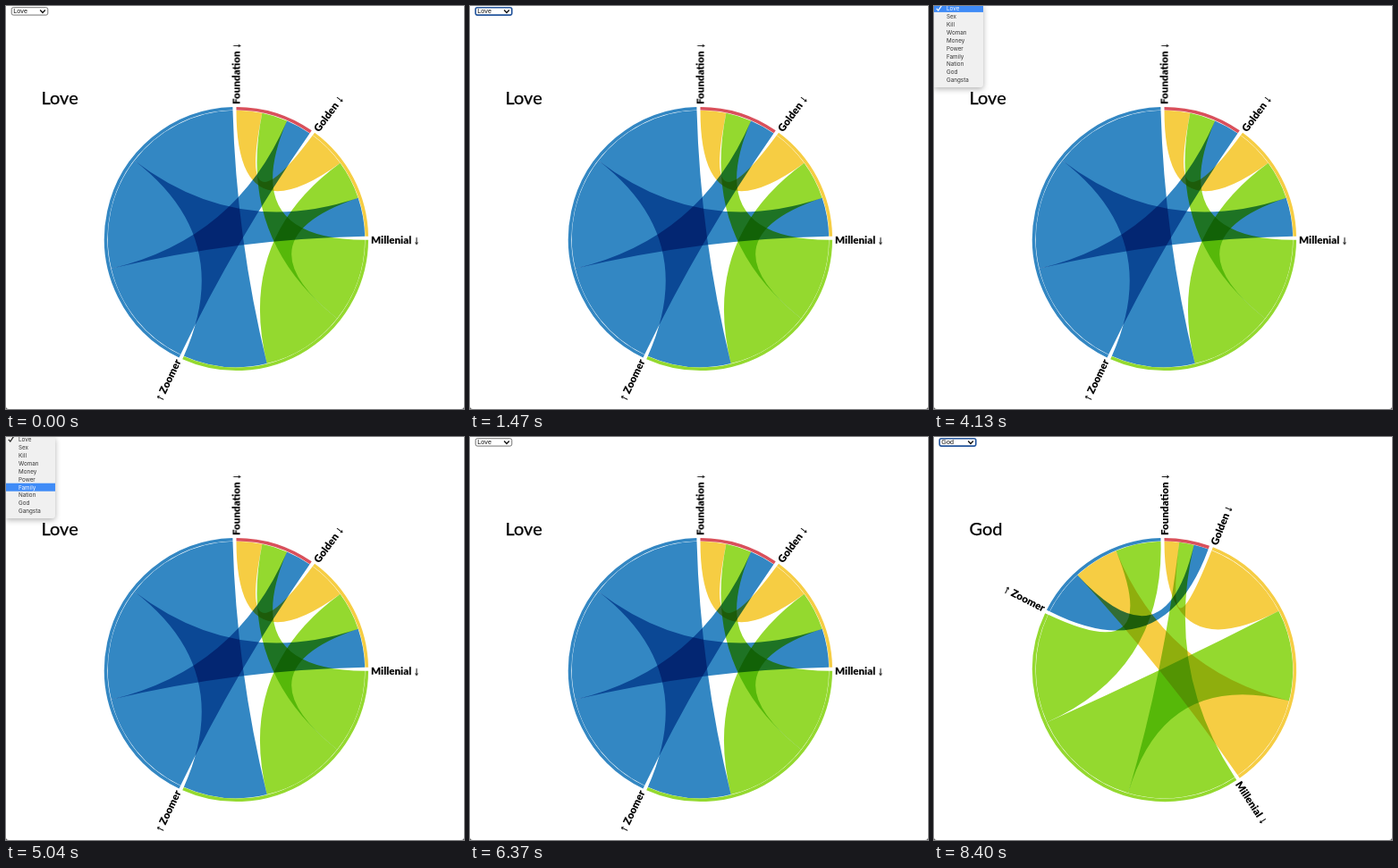
Recreate the animation shown at these times as an HTML page. Size 512 by 451 pixels, loop 8470 ms.

```html
<!DOCTYPE html>
<html lang="en">
<head>
<meta charset="utf-8">
<title>Chord diagram</title>
<style>
  html, body { margin: 0; width: 100%; height: 100%; overflow: hidden; background: #555; }
  svg { display: block; width: 100vw; height: 100vh; }
  .ribbon { mix-blend-mode: multiply; }
  .chart { isolation: isolate; }
  .label { font: 900 11.6px Lato, sans-serif; }
  .arrow { font: bold 13px "Liberation Sans", sans-serif; stroke: #000; stroke-width: .3; }
  .title { font: 400 20px Lato, sans-serif; stroke: #000; stroke-width: .25; }
  .value { font: 7.2px "Liberation Sans", Arial, sans-serif; fill: #111; }
  .item { font: 6.3px Inter, sans-serif; fill: #333; }
  .on { fill: #fff; }
  #menu { filter: drop-shadow(0 2px 3px rgba(0, 0, 0, .3)); }
</style>
</head>
<body>
<svg id="stage" viewBox="0 0 512 451">
  <path d="M0 0H512V448Q512 451 509 451H3Q0 451 0 448Z" fill="#fff"/>
  <g id="charts"></g>
  <text id="title" class="title" x="39.5" y="109.5"></text>
  <g id="select">
    <rect id="box" x="6.2" y="1.7" width="40.6" height="8.4" rx="2" fill="#fff"/>
    <text id="value" class="value" x="8.3" y="8.3"></text>
    <path d="M38.2 4.6L41 7.4L43.8 4.6" fill="none" stroke="#111" stroke-width="1.4"/>
  </g>
  <g id="menu">
    <path d="M0 0H55V88Q55 91 52 91H0Z" fill="#f0f0f0"/>
    <rect id="bar" width="55" height="9" fill="#3f8bf7"/>
    <path id="check" d="M2.8 2.8L4.8 5L8.6 -.6" fill="none" stroke-width="1.2"/>
  </g>
</svg>
<script>
const LOOP = 8470, PAD = 1.6, CX = 257.5, CY = 260.5;
const RIBBON_R = 143.7, RING_R = 145.8, RING_W = 3.6, LABEL_R = 150.5;
const names = ['Foundation', 'Golden', 'Millenial', 'Zoomer'];
const colors = ['#d9505b', '#f6cd43', '#94d92f', '#3387c3'];
const words = ['Love', 'Sex', 'Kill', 'Woman', 'Money', 'Power', 'Family', 'Nation', 'God', 'Gangsta'];
const spans = { Love: [34.8, 52.5, 113.6, 152.7], God: [20, 123.6, 148.6, 61.4] };

const FOCUS = 1400, OPEN = 3500, CLOSE = 6300, SWAP = 6440;
// When the highlight reaches each menu row
const hover = [OPEN, 4270, 4410, 4550, 4690, 4830, 4970, 5530, 5740];

const $ = id => document.getElementById(id);

function add(parent, tag, attrs, text = '') {
  const el = document.createElementNS('http://www.w3.org/2000/svg', tag);
  for (const key in attrs) el.setAttribute(key, attrs[key]);
  el.textContent = text;
  parent.appendChild(el);
  return el;
}

function point(deg, r) {
  const a = deg * Math.PI / 180;
  return `${(r * Math.sin(a)).toFixed(2)} ${(-r * Math.cos(a)).toFixed(2)}`;
}

const arc = (from, to, r) => `A${r} ${r} 0 ${to - from > 180 ? 1 : 0} 1 ${point(to, r)}`;

function ribbon([s0, s1], [t0, t1]) {
  const r = RIBBON_R;
  return `M${point(s0, r)}${arc(s0, s1, r)}Q0 0 ${point(t0, r)}${arc(t0, t1, r)}Q0 0 ${point(s0, r)}Z`;
}

function addLabel(chart, name, deg) {
  const flip = deg > 180;
  const text = add(chart, 'text', {
    class: 'label', dy: '.35em', 'text-anchor': flip ? 'end' : 'start',
    transform: `rotate(${deg - 90}) translate(${LABEL_R})${flip ? ' rotate(180)' : ''}`
  });
  const arrow = () => add(text, 'tspan', { class: 'arrow' }, flip ? '↑' : '↓');
  if (flip) arrow();
  text.append(flip ? ' ' + name : name + ' ');
  if (!flip) arrow();
}

function buildChart(sizes) {
  const chart = add($('charts'), 'g', { class: 'chart', transform: `translate(${CX} ${CY})` });
  let next = 0;
  const starts = sizes.map(size => {
    const start = next;
    next += size + PAD;
    return start;
  });
  // Each group is shared equally among the other three
  const part = (i, j) => {
    const third = sizes[i] / 3, from = starts[i] + third * (j < i ? j : j - 1);
    return [from, from + third];
  };
  sizes.forEach((size, i) => {
    for (let j = i + 1; j < sizes.length; j++) {
      add(chart, 'path', {
        class: 'ribbon', d: ribbon(part(i, j), part(j, i)),
        fill: colors[size > sizes[j] ? i : j]
      });
    }
  });
  sizes.forEach((size, i) => {
    const from = starts[i];
    add(chart, 'path', {
      d: `M${point(from, RING_R)}${arc(from, from + size, RING_R)}`,
      fill: 'none', stroke: colors[i], 'stroke-width': RING_W
    });
    addLabel(chart, names[i], from);
  });
  return chart;
}

const charts = {};
for (const word in spans) charts[word] = buildChart(spans[word]);
const rowY = i => 2.4 + i * 8.97;
const items = words.map((word, i) => add($('menu'), 'text', { class: 'item', x: 14, y: rowY(i) + 2.3 }, word));

const show = (el, on) => el.setAttribute('visibility', on ? 'visible' : 'hidden');

function draw() {
  const t = performance.now() % LOOP;
  const word = t < SWAP ? 'Love' : 'God';
  const open = t >= OPEN && t < CLOSE;
  const focused = t >= FOCUS && t < CLOSE || t >= SWAP;
  const row = Math.max(0, hover.filter(time => t >= time).length - 1);

  for (const key in charts) charts[key].style.display = key === word ? '' : 'none';
  $('title').textContent = $('value').textContent = word;
  $('box').setAttribute('stroke', focused ? '#24559c' : '#666');
  $('box').setAttribute('stroke-width', focused ? 1.6 : .9);
  show($('select'), !open);
  show($('menu'), open);
  $('bar').setAttribute('y', rowY(row) - 4.5);
  $('check').setAttribute('stroke', row ? '#222' : '#fff');
  items.forEach((item, i) => item.classList.toggle('on', i === row));
  requestAnimationFrame(draw);
}
draw();
</script>
</body>
</html>
```
